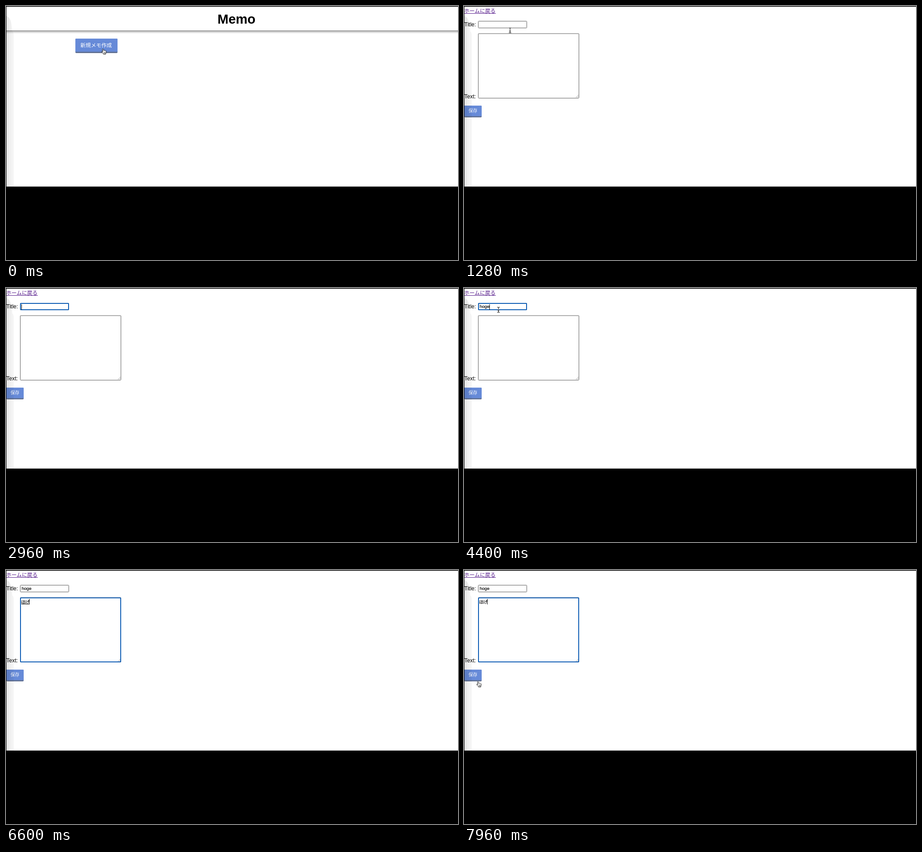
These frames come from a looping animation (997 by 561 pixels, 8 s). An HTML page:

```html
<!DOCTYPE html>
<html lang="ja">
<head>
<meta charset="utf-8">
<title>Memo</title>
<style>
  html, body { margin: 0; width: 100%; height: 100%; overflow: hidden; background: #000; }
  svg { display: block; width: 100%; height: 100%; }
  text { font-family: "Liberation Sans", "Noto Sans CJK JP", sans-serif; font-size: 12px; }
  .jp { font-family: "Noto Sans CJK JP", "Noto Sans CJK", sans-serif; }
  .wide { font-size: 11.6px; }
  .typed { font-size: 9.7px; stroke: #000; stroke-width: .2px; }
  .memo-text { font-size: 9.3px; }
  .heading { font-size: 29px; font-weight: 700; }
  .link { fill: #551a8b; }
  .field { fill: #fff; stroke: #5c5c5c; }
  .ring { fill: none; stroke: #0d5cb4; stroke-width: 2; }

  /* 1% of the loop is 80 ms */
  [style*="--show"] { animation: var(--show) 8s step-end -10ms infinite; }
  .pointer { animation: move 8s linear -10ms infinite; }
  .caret { animation: caret 8s step-end -10ms infinite; }

  @keyframes home { 6.5%, 100% { opacity: 0; } }
  @keyframes form { 0% { opacity: 0; } 6.5%, 100% { opacity: 1; } }
  @keyframes title-focus { 0% { opacity: 0; } 30% { opacity: 1; } 67%, 100% { opacity: 0; } }
  @keyframes memo-focus { 0% { opacity: 0; } 67%, 100% { opacity: 1; } }

  @keyframes title-1 { 0% { opacity: 0; } 45% { opacity: 1; } 46%, 100% { opacity: 0; } }
  @keyframes title-2 { 0% { opacity: 0; } 46% { opacity: 1; } 54%, 100% { opacity: 0; } }
  @keyframes title-3 { 0% { opacity: 0; } 48% { opacity: 1; } 49%, 100% { opacity: 0; } }
  @keyframes title-4 { 0% { opacity: 0; } 49% { opacity: 1; } 54%, 100% { opacity: 0; } }
  @keyframes title-done { 0% { opacity: 0; } 54%, 100% { opacity: 1; } }

  @keyframes memo-1 { 0% { opacity: 0; } 78% { opacity: 1; } 79%, 100% { opacity: 0; } }
  @keyframes memo-2 { 0% { opacity: 0; } 79%, 100% { opacity: 1; } }
  @keyframes memo-3 { 0% { opacity: 0; } 81.5% { opacity: 1; } 82.5%, 100% { opacity: 0; } }
  @keyframes memo-4 { 0% { opacity: 0; } 82.5%, 100% { opacity: 1; } }
  @keyframes memo-line-1 { 0% { opacity: 0; } 78% { opacity: 1; } 86.5%, 100% { opacity: 0; } }
  @keyframes memo-line-2 { 0% { opacity: 0; } 81.5% { opacity: 1; } 86.5%, 100% { opacity: 0; } }

  @keyframes caret {
    0% { opacity: 0; transform: translate(34px, 36px); }
    37% { opacity: 1; transform: translate(34px, 36px); }
    42% { opacity: 0; transform: translate(34px, 36px); }
    54% { opacity: 1; transform: translate(56px, 36px); }
    67% { opacity: 1; transform: translate(34px, 64px); }
    73.5% { opacity: 0; transform: translate(34px, 64px); }
    78% { opacity: 1; transform: translate(42px, 64px); }
    81.5% { opacity: 1; transform: translate(51px, 64px); }
    92.5% { opacity: 0; transform: translate(51px, 64px); }
    98.5%, 100% { opacity: 1; transform: translate(51px, 64px); }
  }

  @keyframes move {
    0%, 6.5% { transform: translate(214px, 94.5px); }
    8.5% { transform: translate(214.5px, 94.5px); }
    12% { transform: translate(165px, 76px); }
    16.5% { transform: translate(96px, 52px); }
    20% { transform: translate(80.5px, 46.5px); }
    25.5%, 54% { transform: translate(76px, 42.5px); }
    58%, 61% { transform: translate(76px, 62px); }
    65%, 72% { transform: translate(79px, 113.5px); }
    95% { transform: translate(71px, 130px); }
    96.5% { transform: translate(62px, 165px); }
    98% { transform: translate(45px, 215px); }
    99.5%, 100% { transform: translate(31px, 246.5px); }
  }
  @keyframes beam {
    0% { opacity: 0; } 6.5% { opacity: 1; } 33% { opacity: 0; } 54% { opacity: 1; }
    72% { opacity: 0; } 95% { opacity: 1; } 97.6%, 100% { opacity: 0; }
  }
  @keyframes arrow { 0% { opacity: 0; } 97.6% { opacity: 1; } 98.4%, 100% { opacity: 0; } }
  @keyframes hand { 0% { opacity: 1; } 6.5% { opacity: 0; } 98.4%, 100% { opacity: 1; } }
</style>
</head>
<body>
<svg viewBox="0 0 997 561" preserveAspectRatio="none">
  <defs>
    <linearGradient id="edge" gradientUnits="userSpaceOnUse" x1="1" x2="17">
      <stop offset="0" stop-opacity=".1"/>
      <stop offset=".3" stop-opacity=".085"/>
      <stop offset=".3" stop-opacity=".07"/>
      <stop offset=".6" stop-opacity=".06"/>
      <stop offset=".6" stop-opacity=".05"/>
      <stop offset="1" stop-opacity=".035"/>
    </linearGradient>
    <linearGradient id="shade" x2="0" y2="1">
      <stop offset="0" stop-opacity=".5"/>
      <stop offset=".35" stop-opacity=".22"/>
      <stop offset="1" stop-opacity="0"/>
    </linearGradient>
  </defs>

  <rect width="997" height="561"/>
  <rect x="1" y="1.5" width="996" height="397.3" fill="#fff"/>

  <g style="--show: home">
    <rect x="1" y="54" width="996" height="7" fill="url(#shade)"/>
    <text class="heading" x="466.5" y="39">Memo</text>
    <rect x="153" y="72" width="93" height="32" rx="2" fill="#627295"/>
    <path d="M153 101V74q0-2 2-2h89q2 0 2 2v27z" fill="#668ad8"/>
    <text class="jp wide" x="164" y="91" fill="#fff">新規メモ作成</text>
  </g>

  <g style="--show: form">
    <text class="jp wide link" x="0.5" y="15">ホームに戻る</text>
    <path d="M1 16.5H70" stroke="#551a8b"/>
    <text x="0.8" y="44.5">Title:</text>
    <text x="0.8" y="203.5">Text:</text>
    <rect class="field" x="31.5" y="33.5" width="107" height="15" rx="1"/>
    <rect class="field" x="31.5" y="61" width="222" height="142.5" rx="1"/>
    <path d="M247 202l5.5-5.5M250 202l2.5-2.5" stroke="#888" stroke-width=".8"/>
    <rect x="1" y="220" width="38" height="26" rx="2" fill="#627295"/>
    <path d="M1 243.3V220h36q2 0 2 2v21.3z" fill="#668ad8"/>
    <text class="jp" x="10" y="234.8" fill="#fff" style="font-size: 9.7px">保存</text>

    <rect class="ring" style="--show: title-focus" x="32" y="34" width="106" height="14" rx="1.5"/>
    <rect class="ring" style="--show: memo-focus" x="32" y="61.5" width="221" height="141.5" rx="1.5"/>

    <g class="jp">
      <text class="jp typed" style="--show: title-1" x="35" y="44.6">ｈ</text>
      <text class="jp typed" style="--show: title-2" x="35" y="44.6">ほ</text>
      <text class="jp typed" style="--show: title-3" x="45" y="44.6">ｇ</text>
      <text class="jp typed" style="--show: title-4" x="45" y="44.6">げ</text>
      <path style="--show: title-2" d="M35 46.3H45" stroke="#000" stroke-width=".8"/>
      <path style="--show: title-4" d="M45 46.3H55" stroke="#000" stroke-width=".8"/>
    </g>
    <text class="typed" style="--show: title-done" x="34.5" y="44.4">hoge</text>

    <g>
      <text class="jp typed memo-text" style="--show: memo-1" x="33.4" y="73.5">ｈ</text>
      <text class="jp typed memo-text" style="--show: memo-2" x="33.4" y="73.5">ほ</text>
      <text class="jp typed memo-text" style="--show: memo-3" x="42.5" y="73.5">ｇ</text>
      <text class="jp typed memo-text" style="--show: memo-4" x="42.5" y="73.5">げ</text>
      <path style="--show: memo-line-1" d="M34 75.4H43" stroke="#000" stroke-width=".9"/>
      <path style="--show: memo-line-2" d="M43 75.4H52" stroke="#000" stroke-width=".9"/>
    </g>
    <rect class="caret" width="1" height="12"/>
  </g>

  <path d="M1 22q9 3 11 18l2 16q3 2 3 8V398.5H1z" fill="url(#edge)"/>

  <g class="pointer">
    <g style="--show: beam" fill="none" stroke-linecap="round">
      <path d="M-2.5-5.8Q0-5.8 0-4Q0-5.8 2.5-5.8M0-4V4M-2.5 5.8Q0 5.8 0 4Q0 5.8 2.5 5.8M-1.3 1.8H1.3" stroke="#fff" stroke-width="2.2"/>
      <path d="M-2.5-5.8Q0-5.8 0-4Q0-5.8 2.5-5.8M0-4V4M-2.5 5.8Q0 5.8 0 4Q0 5.8 2.5 5.8M-1.3 1.8H1.3" stroke="#111" stroke-width="1.1"/>
    </g>
    <path style="--show: arrow" d="M0 0V11l2.6-2.4 1.8 4 1.7-.8-1.8-3.8H8z" stroke="#fff" stroke-width=".7"/>
    <g style="--show: hand" stroke="#000" stroke-width=".9" stroke-linejoin="round">
      <path d="M-1.4.8Q-.8-.4.5.5L1.9 4Q3 2.9 3.9 4Q5 3.2 5.6 4.5Q6.7 4.2 6.9 5.4Q7.6 8 6.2 9.4V11.3H.8Q0 9.5-2.8 7Q-3.6 5.6-2.2 5.5L-.2 6.4z" fill="#fff"/>
      <path d="M2 7.2V9.5M3.5 7.2V9.5M5 7.2V9.5" stroke-width=".7"/>
    </g>
  </g>
</svg>
</body>
</html>
```
